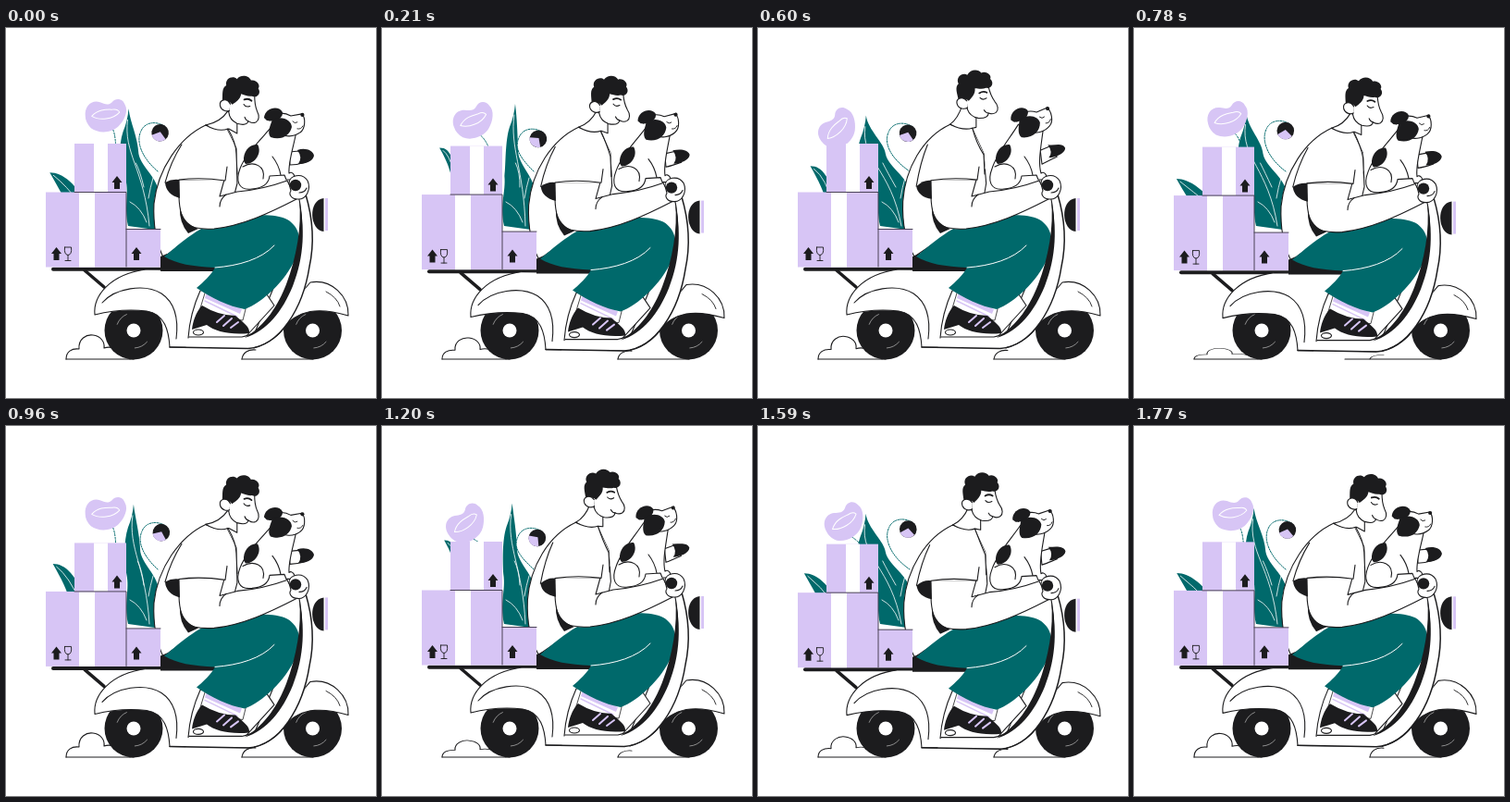
An HTML page with a canvas for the animation above (1.8 s loop, 400 by 400 pixels).

```html
<!DOCTYPE html>
<html lang="en">
<head>
<meta charset="utf-8">
<title>Scooter delivery</title>
<style>
html, body { margin: 0; width: 100%; height: 100%; overflow: hidden; background: #fff; }
canvas { display: block; width: 400px; height: 400px; }
</style>
</head>
<body>
<canvas id="stage"></canvas>
<script>
const canvas = document.getElementById('stage');
const ctx = canvas.getContext('2d');
const dpr = window.devicePixelRatio || 1;
canvas.width = canvas.height = 400 * dpr;

const INK = '#1c1c1e', TEAL = '#00696b', LILAC = '#d7c5f5', WHITE = '#fff';
const LOOP = 1800, SWAY = 900, BOUNCE = 300;

const wave = (t, peak, period = SWAY) => Math.cos(2 * Math.PI * (t - peak) / period);
const lerp = (a, b, k) => a + (b - a) * k;
const rad = deg => deg * Math.PI / 180;

// Blend two path strings that share the same commands.
function blend(a, b, k) {
  const nums = b.match(/-?[\d.]+/g);
  let i = 0;
  return a.replace(/-?[\d.]+/g, n => lerp(+n, +nums[i++], k).toFixed(2));
}

function shape(d, fill, line = INK, width = 1.1) {
  const p = new Path2D(d);
  if (fill) { ctx.fillStyle = fill; ctx.fill(p); }
  if (line) { ctx.strokeStyle = line; ctx.lineWidth = width; ctx.stroke(p); }
}
const solid = (d, fill) => shape(d, fill, null);
const stroke = (d, color = INK, width = 1.1) => shape(d, null, color, width);

function disc(x, y, r, fill) {
  ctx.fillStyle = fill;
  ctx.beginPath();
  ctx.arc(x, y, r, 0, 7);
  ctx.fill();
}

function rect(x, y, w, h, fill) {
  ctx.fillStyle = fill;
  ctx.fillRect(x, y, w, h);
}

function moved(x, y, angle, draw) {
  ctx.save();
  ctx.translate(x, y);
  ctx.rotate(rad(angle));
  draw();
  ctx.restore();
}

// Piecewise-linear puff size over half a sway.
function puffSize(t) {
  const keys = [[0, 1], [100, 1], [240, .85], [300, .7], [335, .42], [380, .7], [420, .98], [450, 1]];
  const p = t % 450;
  const i = keys.findIndex(k => k[0] > p);
  const [a, b] = [keys[i - 1], keys[i]];
  return lerp(a[1], b[1], (p - a[0]) / (b[0] - a[0]));
}

function dust(t) {
  const k = puffSize(t);
  ctx.save();
  ctx.translate(0, 358);
  ctx.scale(1, k);
  stroke('M65 0C65 -8 71 -12 79 -11C78 -22 87 -27 94 -26C102 -25 107 -19 106 -12C115 -15 128 -9 134 0');
  stroke('M255 0C256 -7 262 -11 270 -10');
  ctx.restore();
  stroke('M65 358H138M' + (k < .5 ? 228 : 255) + ' 358H332');
}

function wheel(x) {
  disc(x, 327, 31.5, INK);
  disc(x, 327, 7.5, WHITE);
  ctx.strokeStyle = '#aaa';
  ctx.lineWidth = .8;
  for (const a of [.7, 3.5]) {
    ctx.beginPath();
    ctx.arc(x, 327, 19, a, a + .8);
    ctx.stroke();
  }
}

function plants(t, s) {
  // side leaf
  const lx = 57 + 11.5 * wave(t, 370), ly = 143 - 20 * wave(t, 330), base = lx * .9 + 21;
  solid(`M${lx} ${ly}C${lx + 14} ${ly} 76 ${ly + 12} 90 195L${base + 4} 195C${base} ${ly + 28} ${lx + 9} ${ly + 16} ${lx} ${ly}Z`, TEAL);
  stroke(`M${lx + 4} ${ly + 3}Q${lx + 18} ${ly + 14} 80 190`, WHITE, .8);

  // tall leaf
  const k = wave(t, 200), x = 130 + 14 * k, y = 88.5 - 6.5 * k, mid = x * .35 + 97;
  solid(`M${x} ${y}C${x + 2} ${y + 16} ${mid - 1} ${y + 30} ${mid} 136C${mid + 3} 152 167 162 167 188L161 218L132 214C127 190 134 178 ${mid - 15} 160C${x - 10} 148 ${x - 11} ${y + 40} ${x - 6} ${y + 25}Q${x - 1} ${y + 13} ${x} ${y}Z`, TEAL);
  stroke(`M${x - 1} ${y + 12}C${x - 6} ${y + 48} ${mid + 6} 152 155 214M${mid - 3} 146Q${mid + 2} 156 149 172M159 162Q156 172 154 184M134 188Q146 194 152 210`, WHITE, .8);

  // berry on its curled stem
  const bx = 165.5 + 3.5 * wave(t, 180), by = 116 + 5 * wave(t, 310);
  ctx.setLineDash([1.5, 1.2]);
  shape(`M164 155C${bx - 20} 140 ${bx - 26} ${by + 10} ${bx - 21} ${by - 1}C${bx - 17} ${by - 12} ${bx - 4} ${by - 13} ${bx + 5} ${by - 7}`, WHITE, TEAL, 1);
  ctx.setLineDash([]);
  moved(bx, by, 4 * (by - 111), () => {
    disc(0, 0, 9.3, INK);
    solid('M-8.5 4L0 -1L7 6A9.3 9.3 0 0 1 -8.5 4Z', LILAC);
  });

  // lilac bloom
  const fx = lerp(108, 82, s), fy = lerp(94, 112.5, s);
  ctx.setLineDash([2, 1.5]);
  stroke(`M${fx + 8} ${fy + 16}Q${lerp(119, 105, s)} ${fy + 22} 119 140`, TEAL, 1);
  ctx.setLineDash([]);
  moved(fx, fy, -46 * s, () => {
    solid('M-22 1C-23 -10 -15 -17 -6 -14C-1 -12 3 -10 7 -14C11 -19 19 -18 21 -11C25 -4 20 6 14 12C6 20 -8 20 -16 14C-20 10 -22 5 -22 1Z', LILAC);
    stroke('M-15 1C-8 -7 2 -6 7 -6Q13 -7 15 -3C8 5 -7 6 -15 1Z', WHITE, 1);
  });
}

const arrow = (x, y) =>
  solid(`M${x} ${y - 7}L${x + 5.5} ${y}H${x + 3}V${y + 7}H${x - 3}V${y}H${x - 5.5}Z`, INK);

function boxes() {
  rect(74, 125, 56, 53, LILAC);
  rect(95, 125, 15, 53, WHITE);
  rect(43, 177.5, 87, 81, LILAC);
  rect(79, 178, 17, 80.5, WHITE);
  rect(130, 217.5, 37, 41, LILAC);
  stroke('M74 177.5H130V258M130 217.5H167', '#4b4356', 1);
  arrow(120, 167);
  arrow(54.5, 244);
  arrow(141, 244);
  stroke('M63.5 237H70.5Q71.5 245 67 245.5Q62.5 245 63.5 237M67 245.5V251.5M64 251.5H70', INK, .9);
}

function rack() {
  stroke('M51 260.7H172', INK, 4);
  stroke('M85 262L106 280', INK, 3.5);
}

function chassis() {
  shape('M329 275C352 271 371 290 370 311C346 304 320 301 302 322C296 332 286 340 268 346Z', WHITE);
  stroke('M346 285Q358 291 361 301', INK, .9);
  shape('M96 310C94 290 112 266 152 261L230 262L300 255L262 346L177 345C176 328 172 309 152 306C134 304 112 306 96 310Z', WHITE);
  stroke('M104 297C118 281 150 276 168 287C186 299 186 320 184 336');
  solid('M167 247L174 244L230 256V263H167Z', INK);
  shape('M210 284Q199 308 197 335H258L290 300L270 270Z', WHITE);
  shape('M202.5 329A5.5 3 0 1 0 213.5 329A5.5 3 0 1 0 202.5 329', WHITE);
}

function legs() {
  shape('M217 280L210 303L232 314L256 316L260 300Z', WHITE, INK, .8);
  solid('M217 286L255 304L253 309L215 292Z', LILAC);
  stroke('M215 295L250 312', LILAC, 1.4);
  solid('M212 300C205 307 202 318 201 326L217 321C226 328 242 332 263 330C264 323 257 319 248 311Q230 311 212 300Z', INK);
  stroke('M228 318L236 311M235 322L244 314M243 324L251 318', LILAC, 2);
  solid('M171 247C190 232 210 212 240 206C262 202 290 200 304 207C318 215 321 232 313 249C302 274 277 297 258 304C241 301 222 292 206 281C214 274 221 268 226 259C202 258 184 255 171 247Z', TEAL);
  stroke('M226 259C252 257 276 250 290 235', WHITE, 1);
}

function shield() {
  shape('M316 180C322 207 321 240 309 272C300 300 281 329 255 334H198L194 346H262C296 343 322 303 329 257C333 228 330 204 324 180Z', WHITE, null);
  stroke('M316 180C322 207 321 240 309 272C300 300 281 329 255 334H198');
  solid('M317 186C323 215 323 246 310 279C299 306 282 328 258 335C281 321 294 300 303 277C314 248 320 215 317 186Z', INK);
  stroke('M324 180C332 207 333 235 328 258C321 303 296 344 262 346.5L177 345', INK, 1.5);
  solid('M343.5 184V220C328 219 326 186 343.5 184Z', INK);
  rect(345, 184, 3, 35, LILAC);
}

function torso(s) {
  shape(blend(
    'M216 105C188 118 164 152 160 190C159 212 163 233 170 248C195 230 215 214 240 207L250 168L249 130L237 106Z',
    'M206 104C176 118 158 152 156 187C155 212 160 233 169 247C195 230 215 214 240 207L246 168L243 137L230 108Z', s), WHITE);
}

function arm(s) {
  shape('M187 164V183C188 210 195 219 225 217C255 214 285 200 314 185L304 165C282 173 262 176 250 177L231 182L236 164Z', WHITE);
  solid('M188 194Q192 212 208 217L197 222Q187 210 188 194Z', INK);
  stroke('M231 193Q231 185 238 180');
  solid(blend('M216 106C199 117 179 145 172 167L187 164L237 165L250 150L249 130L237 106Z',
              'M206 105C191 117 177 145 171 172L187 165L237 164L245 152L243 137L230 108Z', s), WHITE);
  stroke(blend('M190 126Q178 145 172 167M187 164Q211 161 237 165L239 150M216 105Q230 113 240 109Q249 124 249 136L250 158',
               'M182 126Q175 145 171 172M187 165Q211 161 237 164L239 150M206 104Q220 111 230 108Q234 126 243 137L244 158', s));
  solid(blend('M172 167Q179 163 187 164L188 184Q173 180 172 167Z',
              'M171 172Q179 164 187 165L188 185Q173 183 171 172Z', s), INK);
}

function head(s) {
  shape(blend('M240 90Q232 102 216 105Q230 113 241 109L250 114L250 98Z',
              'M217 82Q213 97 206 104Q220 111 230 108L233 106L233 93Z', s), WHITE);
  moved(lerp(253, 230.5, s), lerp(76, 69, s), 17 * (1 - s), () => {
    shape('M-10 3C-12 -6 8 -16 14 -9C16 -2 17 2 22 8C26 12 27 17 24 20C20 23 17 21 16 21C16 26 10 27 5 27C-1 26 -5 23 -7 18Z', WHITE);
    solid('M-17 9C-19 1 -22 -5 -18 -9C-22 -16 -14 -22 -9 -19C-6 -26 3 -26 6 -22C11 -25 18 -20 16 -16C21 -12 18 -5 12 -6C8 -4 3 -5 0 -5C1 1 -3 5 -6 9L-9 7Z', INK);
    shape('M-8 9C-14 3 -21 8 -18 14C-15 19 -9 18 -7 16', WHITE);
    stroke('M6 5Q9 8 13 5M11 18Q13 21 16 21');
    stroke('M5 0Q9 -3 13 -1', INK, 1.8);
  });
}

function dog(s) {
  shape(blend('M307 148C313 148 318 147 324 145L317 133L306 134Z',
              'M307 147C312 144 316 141 323 138L315 127L305 132Z', s), WHITE);
  solid(blend('M315 132C323 129 332 132 333 138C332 144 324 147 316 147Q321 140 315 132Z',
              'M313 125C322 127 328 122 332 128C332 134 322 138 314 139Q319 133 313 125Z', s), INK);
  shape(blend(
    'M288 106C276 120 259 136 253 152C248 165 251 176 266 174C279 173 284 168 285 160L301 159L303 164H311C314 160 309 154 306 157C305 145 311 128 314 112Z',
    'M280 104C271 120 258 135 253 152C248 165 251 176 266 174C279 173 284 168 285 160L301 159L303 164H311C314 160 309 154 306 157C302 145 305 128 307 110Z', s), WHITE);
  solid('M257 144C256 134 263 125 272 126C277 134 270 147 259 147Z', INK);
  stroke('M256 150C268 143 281 149 278 163M288 139Q295 148 297 159');
  moved(lerp(300, 294.5, s), lerp(104, 101, s), -16 * s, () => {
    shape('M-15 -4C-9 -14 1 -13 8 -9L20 -11C24 -7 24 5 18 9C11 14 2 14 -5 10', WHITE);
    solid('M-21 -7C-20 -18 -5 -21 -1 -13C0 -7 -8 -2 -18 -4Z', INK);
    solid('M-12 -5C-1 -10 9 -4 9 3C7 12 -2 18 -14 14C-18 9 -14 1 -12 -5Z', INK);
    disc(20.5, -10, 2.1, INK);
    stroke('M10 -3Q12 0 15 -2M15 5Q19 6 21 2', INK, .9);
  });
}

function hand() {
  shape('M306 168C306 159 320 156 326 165C330 174 325 186 315 185C309 185 305 180 308 176Z', WHITE);
  disc(313, 170, 6.2, INK);
  stroke('M317 178Q323 178 325 173');
}

function draw(t) {
  const s = (1 + wave(t, 480)) / 2;
  const bounce = 2 - 2 * wave(t, 0, BOUNCE);
  ctx.setTransform(dpr, 0, 0, dpr, 0, 0);
  rect(0, 0, 400, 400, WHITE);
  ctx.lineCap = 'round';
  ctx.lineJoin = 'round';
  dust(t);
  wheel(138);
  wheel(331.5);
  plants(t, s);
  ctx.translate(0, bounce);
  torso(s);
  rack();
  boxes();
  chassis();
  legs();
  shield();
  head(s);
  arm(s);
  dog(s);
  hand();
}

function tick() {
  draw(performance.now() % LOOP);
  requestAnimationFrame(tick);
}
tick();
</script>
</body>
</html>
```
